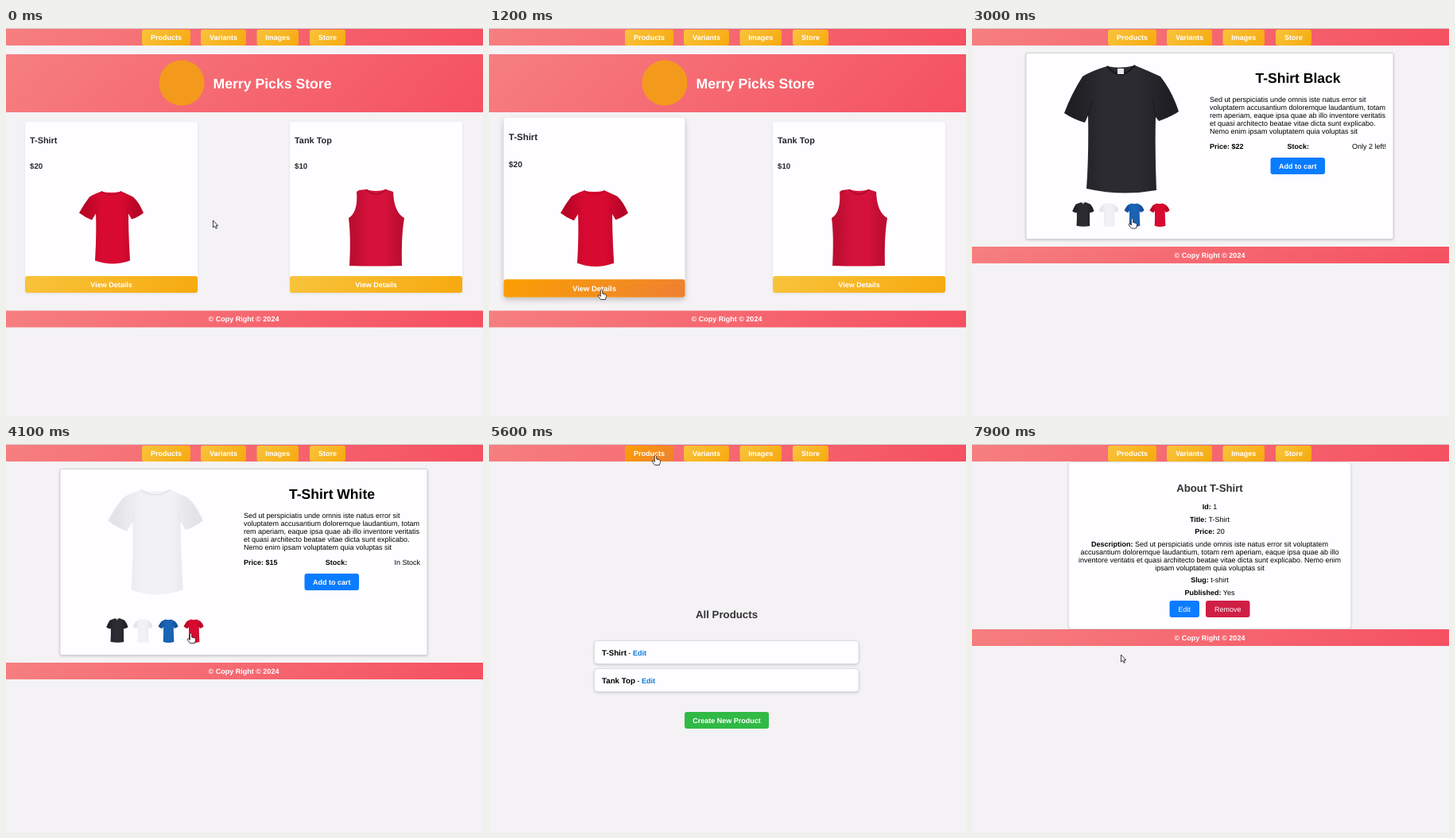
Animation, 600 px wide and 488 px high, one loop 8 s. Source, as an HTML page:

```html
<!DOCTYPE html>
<html lang="en">
<head>
<meta charset="utf-8">
<title>Shop demo</title>
<style>
  html, body { margin: 0; width: 100%; height: 100%; overflow: hidden; background: #f4f2f5; }
  svg { display: block; width: 600px; height: 488px; }
  text { font-family: "Liberation Sans", Arial, sans-serif; text-rendering: geometricPrecision; white-space: pre; }
  .b { font-weight: bold; }
  .card { fill: #fefdff; filter: drop-shadow(0 1px 1.5px rgba(0,0,0,.18)); }
  .page { display: none; }
</style>
</head>
<body>
<svg id="stage" viewBox="0 0 600 488"></svg>
<script>
const PINK = ['#f67f80', '#f55061'], GOLD = ['#f8c43c', '#f7a90e'], AMBER = ['#fb9f04', '#ee8032'];
let gradients = 0;

// Rectangle with a 135 degree gradient, laid out as in CSS
function bar(x, y, w, h, [from, to], r = 0, attrs = '') {
  const id = 'g' + gradients++, cx = x + w / 2, cy = y + h / 2, d = (w + h) / 4;
  return `<linearGradient id="${id}" gradientUnits="userSpaceOnUse" x1="${cx - d}" y1="${cy - d}" x2="${cx + d}" y2="${cy + d}">
    <stop stop-color="${from}"/><stop offset="1" stop-color="${to}"/></linearGradient>
    <rect x="${x}" y="${y}" width="${w}" height="${h}" rx="${r}" fill="url(#${id})" ${attrs}/>`;
}
const rect = (x, y, w, h, r, attrs) => `<rect x="${x}" y="${y}" width="${w}" height="${h}" rx="${r}" ${attrs}/>`;
const text = (x, y, size, str, attrs = '') => `<text x="${x}" y="${y}" font-size="${size}" ${attrs}>${str}</text>`;
const MID = 'text-anchor="middle" ', BOLD = 'class="b" ';
const bold = str => `<tspan class="b">${str}</tspan>`;
const button = (x, y, w, fill, label, attrs = BOLD, id = '') =>
  rect(x, y, w, 21, 3, `fill="${fill}" ${id}`) + text(x + w / 2, y + 13.7, 9, label, MID + attrs + 'fill="#fff"');
const footer = y => bar(0, y, 600, 21, PINK) +
  text(299, y + 13.8, 9, '© Copy Right © 2024', MID + BOLD + 'fill="#fff"');

// Clothes
const DYES = {
  black: ['#1f1f24', '#2b2b31'], white: ['#e4e4e7', '#f2f1f4'],
  blue: ['#134f99', '#1b63b5'], red: ['#b80526', '#d90a31'], tank: ['#bd0d31', '#d4123b']
};
const dyeDefs = Object.entries(DYES).map(([name, [edge, main]]) =>
  `<linearGradient id="${name}"><stop offset=".1" stop-color="${edge}"/><stop offset=".35" stop-color="${main}"/>
   <stop offset=".65" stop-color="${main}"/><stop offset=".9" stop-color="${edge}"/></linearGradient>`).join('');

const WIDE = 'M55 2Q35 8 24 15Q10 37 1 61Q13 69 27 73L31 64Q32 114 29 156Q73 166 117 158Q115 114 116 66L120 71Q135 66 145 59Q137 34 122 15Q107 8 90 1Q72 6 55 2Z';
const SLIM = 'M28 1Q17 5 13 8Q6 17 0 28Q8 34 16 37L21 29Q22 55 20 88Q42 96 64 88Q62 55 62 29L66 36Q75 33 81 28Q75 14 68 8Q60 4 53 1Q40 4 28 1Z';
const seam = (d, color, w) => `<path d="${d}" fill="none" stroke="${color}" stroke-width="${w}"/>`;

function shirt(dye, x, y, sx, sy = sx) {
  const dark = dye === 'black', shade = dark ? '#15151a' : DYES[dye][0];
  const detail = dark
    ? seam('M55 2Q72 23 90 1', '#17171b', 2) + seam('M31 64L36 46M116 66L112 46', '#1a1a1f', 1) +
      '<rect x="68" y="5" width="8" height="7" fill="#e8e8ec"/>'
    : seam('M28 1Q40 10 53 1', shade, 1.2) + seam('M21 29L23 21M62 29L60 21', shade, .7);
  return `<g transform="translate(${x} ${y}) scale(${sx} ${sy})">
    <path d="${dark ? WIDE : SLIM}" fill="url(#${dye})"/>${detail}</g>`;
}
const tank = `<path d="M444 204L453 203Q465 207 478 203L487 206Q488 232 501 239Q497 262 498 299Q465 300 432 299Q434 262 431 239Q443 232 441 206Z" fill="url(#tank)"/>` +
  seam('M453 203Q465 215 478 203', '#a50a2a', 1.2);

// Pages
const product = (id, x, name, price, picture) => `<g id="${id}">
  ${rect(x, 118, 217, 215, 4, 'class="card"')}
  ${text(x + 6, 145, 10.9, name, BOLD + 'fill="#26262a"')}
  ${text(x + 6, 177.3, 9.7, price, BOLD + 'fill="#26262a"')}
  ${picture}
  ${bar(x, 312, 217, 21, GOLD, 3)}
  <g class="hot">${bar(x, 312, 217, 21, AMBER, 3)}</g>
  ${text(x + 108.5, 325.5, 9, 'View Details', MID + BOLD + 'fill="#fff"')}</g>`;

const store = bar(0, 33, 600, 73, PINK) +
  '<circle cx="221" cy="69" r="28.5" fill="#f39a1d"/>' +
  text(260.5, 76, 17.65, 'Merry Picks Store', BOLD + 'fill="#fff"') +
  product('shirtCard', 24, 'T-Shirt', '$20', shirt('red', 92, 204.5, 1)) +
  product('tankCard', 357, 'Tank Top', '$10', tank) +
  footer(355.5);

const LOREM = ['Sed ut perspiciatis unde omnis iste natus error sit',
  'voluptatem accusantium doloremque laudantium, totam',
  'rem aperiam, eaque ipsa quae ab illo inventore veritatis',
  'et quasi architecto beatae vitae dicta sunt explicabo.',
  'Nemo enim ipsam voluptatem quia voluptas sit'];

function detail(dye, name, price, stock, stockX) {
  const big = dye === 'black' ? shirt(dye, 115, 46, 1) : shirt(dye, 128, 56, 1.48, 1.45);
  return rect(68, 31.5, 462, 234, 2, 'class="card" stroke="#ccc" stroke-width=".8"') + big +
    shirt('black', 126, 219, .19) + shirt('white', 159.5, 220.5, .31, .32) +
    shirt('blue', 191.5, 220.5, .31, .32) + shirt('red', 223.5, 220.5, .31, .32) +
    text(410, 69, 17.5, 'T-Shirt ' + name, MID + BOLD) +
    LOREM.map((line, i) => text(299, 93 + 10.1 * i, 9, line)).join('') +
    text(299, 152, 9, 'Price: ' + price, BOLD) + text(stockX, 152, 9, 'Stock:', BOLD) +
    text(521, 152, 9, stock, 'text-anchor="end"') +
    button(375.5, 163, 68.5, '#0a7cff', 'Add to cart') + footer(275);
}

const row = (y, name, dash) => rect(132.5, y, 332.5, 29, 4, 'class="card" stroke="#d8d7da" stroke-width=".8"') +
  text(142, y + 18.2, 9.75, name, BOLD) + text(dash, y + 18.2, 9, '-') +
  text(dash + 5.4, y + 18.2, 9, 'Edit', BOLD + 'fill="#0a78dc"');
const list = text(299, 219, 13.25, 'All Products', MID + BOLD + 'fill="#333"') +
  row(247.5, 'T-Shirt', 175.5) + row(282.5, 'Tank Top', 186.5) +
  button(246, 337, 106, '#30b945', 'Create New Product', BOLD, 'id="create"');

const facts = [[82, bold('Id:') + ' 1'], [97.5, bold('Title:') + ' T-Shirt'], [113, bold('Price:') + ' 20'],
  [128.6, bold('Description:') + ' Sed ut perspiciatis unde omnis iste natus error sit voluptatem'],
  [138.6, 'accusantium doloremque laudantium, totam rem aperiam, eaque ipsa quae ab illo'],
  [148.6, 'inventore veritatis et quasi architecto beatae vitae dicta sunt explicabo. Nemo enim'],
  [158.6, 'ipsam voluptatem quia voluptas sit'],
  [174, bold('Slug:') + ' t-shirt'], [189.5, bold('Published:') + ' Yes']];
const about = rect(121.5, 23, 355, 209.5, 4, 'class="card" stroke="#ddd" stroke-width=".6"') +
  text(299, 60, 13.2, 'About T-Shirt', MID + BOLD + 'fill="#333"') +
  facts.map(([y, str]) => text(299, y, 9, str, MID)).join('') +
  button(248.5, 197, 37.5, '#0a7cff', 'Edit', '') + button(294, 197, 55.5, '#d01f45', 'Remove', '') + footer(233);

const pages = [
  [0, store],
  [1700, detail('black', 'Black', '$22', 'Only 2 left!', 396.5)],
  [3200, detail('blue', 'Blue', '$18', 'Only 5 left!', 396.5)],
  [3800, detail('white', 'White', '$15', 'In Stock', 401.8)],
  [4300, detail('red', 'Red', '$20', 'In Stock', 401.8)],
  [5600, list],
  [7900, about]
];

const tab = (x, w, label) => bar(x, 2, w, 20, GOLD, 3) +
  (label === 'Products' ? `<g id="tabHot">${bar(x, 2, w, 20, AMBER, 3)}</g>` : '') +
  text(x + w / 2, 15, 9, label, MID + BOLD + 'fill="#fff"');
const nav = rect(0, 0, 600, 1, 0, 'fill="#d6d8de"') + bar(0, 1, 600, 21, PINK) +
  tab(171, 61, 'Products') + tab(245, 57, 'Variants') + tab(315.5, 52.5, 'Images') + tab(382, 45, 'Store');

const pointer = `<g id="cursor" fill="#fff" stroke="#111" stroke-width=".8" stroke-linejoin="round">
  <path id="arrow" d="M0 0V9L2 7.2L3.5 10.3L4.9 9.7L3.6 6.7H6.2Z"/>
  <path id="hand" d="M-1.2 1Q0 -.8 1.2 1V5L5 6Q6.3 6.5 6 8.5L5 12.5H-1L-4.2 8.4Q-4.5 6.5 -2.9 7L-1.2 8.5Z"/></g>`;

const $ = id => document.getElementById(id);
$('stage').innerHTML = `<defs>${dyeDefs}</defs>` + nav +
  pages.map(p => `<g class="page">${p[1]}</g>`).join('') + pointer;
const pageNodes = [...document.querySelectorAll('.page')];

// Cursor path: time, x, y
const path = [[0, 260.5, 242], [500, 440, 300], [700, 440, 300], [800, 150.5, 310.5], [1200, 141.5, 329],
  [2200, 141.5, 329], [2300, 182.5, 270.5], [2600, 182.5, 270.5], [3000, 201.5, 239.5], [3600, 201.5, 239.5],
  [3700, 172, 240], [4000, 172, 240], [4100, 232.5, 238], [4500, 232.5, 238], [5400, 209.5, 14],
  [5900, 209.5, 14], [6400, 160, 262], [6800, 300, 345], [7300, 187.5, 265], [8000, 187.5, 265]];
const handTimes = [[900, 1700], [2800, 4600], [5300, 6100], [6300, 6500], [6700, 6900], [7200, 7900]];

const clamp = u => Math.max(0, Math.min(1, u));
const between = (t, a, b) => t >= a && t < b;
const show = (node, on) => node.style.display = on ? 'inline' : 'none';
const grow = (t, start) => 1 - (1 - clamp((t - start) / 300)) ** 2;

function hover(id, cx, amount) {
  const card = $(id), s = 1 + .05 * amount;
  card.setAttribute('transform', `translate(${cx} 225.5) scale(${s}) translate(${-cx} -225.5)`);
  card.querySelector('.card').style.filter =
    `drop-shadow(0 ${1 + 2 * amount}px ${1.5 + 2 * amount}px rgba(0,0,0,${.08 + .14 * amount}))`;
}

function render(t) {
  const current = pages.findLastIndex(p => p[0] <= t);
  pageNodes.forEach((node, i) => show(node, i === current));

  hover('shirtCard', 132.5, grow(t, 758));
  hover('tankCard', 465.5, grow(t, 250) - grow(t, 725));
  show($('shirtCard').querySelector('.hot'), t >= 900);
  show($('tankCard').querySelector('.hot'), false);
  show($('tabHot'), between(t, 5300, 6100));
  $('create').setAttribute('fill', between(t, 6700, 6900) ? '#23923a' : '#30b945');

  const i = path.findLastIndex(p => p[0] <= t);
  const [t0, x0, y0] = path[i], [t1, x1, y1] = path[i + 1];
  const u = (t - t0) / (t1 - t0), e = u * u * (3 - 2 * u);
  $('cursor').setAttribute('transform', `translate(${x0 + (x1 - x0) * e} ${y0 + (y1 - y0) * e})`);
  const hand = handTimes.some(([a, b]) => between(t, a, b));
  show($('hand'), hand);
  show($('arrow'), !hand);
}

// The picture advances in steps of 100 ms
const begin = performance.now();
function tick() {
  render(Math.floor((performance.now() - begin) % 8000 / 100) * 100);
  requestAnimationFrame(tick);
}
tick();
</script>
</body>
</html>
```
